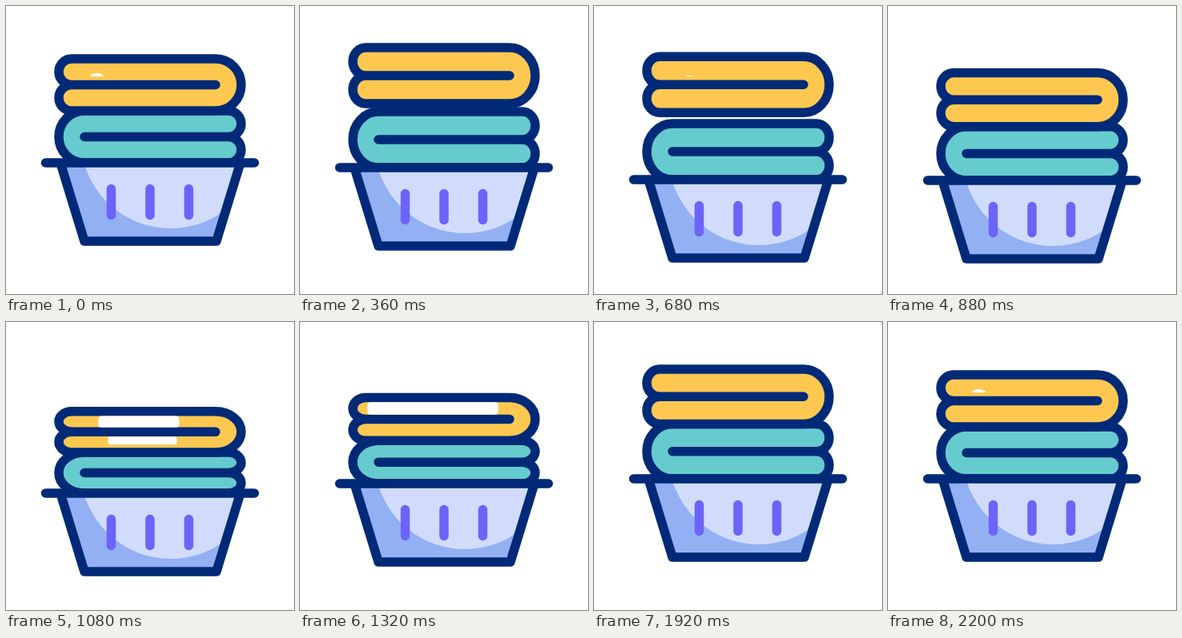
Recreate the animation shown at these times as an HTML page. Size 360 by 360 pixels, loop 2.28 s.

```html
<!DOCTYPE html>
<html>
<head>
<meta charset="utf-8">
<style>
html, body { margin: 0; height: 100%; overflow: hidden; background: #fff; }
svg { display: block; width: 100vw; height: 100vh; }
.line { stroke: #002a77; stroke-width: 11.5; stroke-linecap: round; stroke-linejoin: round; }
</style>
</head>
<body>
<svg viewBox="0 0 360 360">
  <defs>
    <clipPath id="body"><path d="M68 196L98 294H263L293 196Z"/></clipPath>
  </defs>
  <path id="teal" class="line" fill="#66cbcf" transform="matrix(-1 0 0 1 360 0)"/>
  <path id="yellow" class="line" fill="#fec850"/>
  <g id="shine" fill="#fff">
    <rect id="upper" rx="4"/>
    <rect id="lower" rx="3"/>
    <path id="glint"/>
  </g>
  <g id="basket">
    <g clip-path="url(#body)">
      <path d="M60 190H300V300H60Z" fill="#93b0f3"/>
      <circle cx="206" cy="165" r="113" fill="#d1dcfd"/>
    </g>
    <path d="M131.5 228.5V261.5M180 228.5V261.5M228.5 228.5V261.5" stroke="#6c63f8" stroke-width="11.5" stroke-linecap="round"/>
    <path class="line" fill="none" d="M68 196L98 294H263L293 196M49.5 196H310.5"/>
  </g>
</svg>
<script>
const LOOP = 2280, STEP = 40;
const $ = id => document.getElementById(id);
const set = (id, attrs) => {
  for (const k in attrs) $(id).setAttribute(k, attrs[k]);
};
const part = (t, a, b) => Math.min(1, Math.max(0, (t - a) / (b - a)));
const ramp = (t, a, b) => (1 - Math.cos(Math.PI * part(t, a, b))) / 2;
const bump = (t, a, b) => Math.sin(Math.PI * part(t, a, b));

// A folded towel: one wide bend on the right, two rounded ends on the left
function towel(top, h) {
  const mid = top + h / 2, end = top + h;
  return `M82 ${top}H262A32 ${h / 2} 0 0 1 262 ${end}H82` +
    `A16 ${h / 4} 0 0 1 82 ${mid}A16 ${h / 4} 0 0 1 82 ${top}Z` +
    `M76 ${mid}H262`;
}

function bar(id, cx, half, y, height) {
  set(id, { x: cx - half, y, width: 2 * half, height });
}

function draw(t) {
  const drop = 22 * (ramp(t, 141, 765) - ramp(t, 898, 1547));
  const h = 65 + 5 * ramp(t, 80, 340) - 20 * ramp(t, 800, 1130)
    + 20.5 * ramp(t, 1180, 1680) - 5.5 * ramp(t, 1720, 2200);
  const gap = 20 * bump(t, 270, 810);
  const tealTop = 196 + drop - h;
  const top = tealTop - gap - h;
  const mid = top + h / 2;

  set('basket', { transform: `translate(0 ${drop})` });
  set('teal', { d: towel(tealTop, h) });
  set('yellow', { d: towel(top, h) });

  // White gaps that open in the yellow cloth while it is squashed
  bar('upper', 166, 86 * bump(t, 960, 1560), top + 5.7, h / 2 - 11.4);
  bar('lower', 170.5, 43 * bump(t, 960, 1200), mid + 6, 10);
  const resting = t < 120 || t >= 2200;
  const size = resting ? 4 : t >= 640 && t < 720 ? 1 : 0;
  const x = resting ? 105 : 114, w = resting ? 17 : 9;
  set('glint', { d: size ? `M${x} ${mid - 10.5}a${w / 2} ${size} 0 0 1 ${w} 0Z` : '' });
}

function frame() {
  const t = performance.now() % LOOP;
  draw(Math.floor(t / STEP) * STEP);
  requestAnimationFrame(frame);
}
frame();
</script>
</body>
</html>
```
